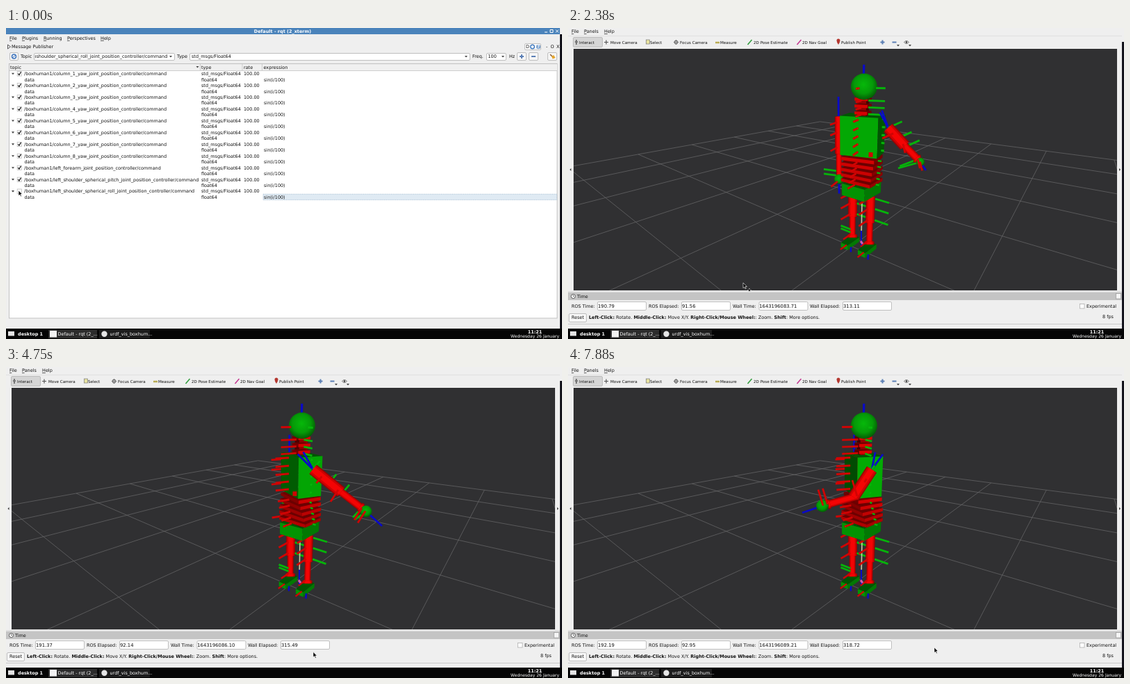
These frames come from a looping animation (800x448 px, 8000 ms). An HTML page:

```html
<!DOCTYPE html>
<html lang="en">
<head>
<meta charset="utf-8">
<title>Message publisher and robot view</title>
<style>
html, body { margin: 0; width: 100%; height: 100%; overflow: hidden; background: #efefef; }
svg { display: block; width: 800px; height: 448px; }
text { font: 6.47px "DejaVu Sans", sans-serif; fill: #111; white-space: pre; }
.b { font-weight: bold; }
.w { fill: #fff; }
.tool { font-size: 5.6px; }
.num { font-size: 6.8px; }
</style>
</head>
<body>
<svg id="stage" viewBox="0 0 800 448" xmlns="http://www.w3.org/2000/svg">
  <defs>
    <radialGradient id="ball" cx=".48" cy=".42" r=".58">
      <stop offset="0" stop-color="#06b80a"/><stop offset=".6" stop-color="#059a08"/><stop offset="1" stop-color="#035a05"/>
    </radialGradient>
    <clipPath id="view"><rect x="8" y="30" width="782" height="348"/></clipPath>
  </defs>
  <g id="publisher"></g>
  <g id="viewer"><g id="viewerFrame"></g><g clip-path="url(#view)"><g id="grid"></g><g id="robot"></g></g><g id="readout"></g></g>
  <g id="taskbar"></g>
  <g id="cursor"></g>
</svg>
<script>
const LOOP = 8000, STEP = 125, SWITCH = 1625;
const el = id => document.getElementById(id);
const f1 = n => n.toFixed(1);

// ---------- drawing helpers ----------
const rect = (x, y, w, h, fill, more = '') => `<rect x="${x}" y="${y}" width="${w}" height="${h}" fill="${fill}" ${more}/>`;
const field = (x, y, w, h, fill = '#fff') => rect(x + .5, y + .5, w - 1, h - 1, fill, 'stroke="#b2b2b2" stroke-width=".8" rx="1.5"');
const text = (x, y, s, cls = '', more = '') => `<text x="${x}" y="${y + 2.4}" class="${cls}" ${more}>${s}</text>`;
const path = (d, stroke, w = 1, fill = 'none') => `<path d="${d}" stroke="${stroke}" stroke-width="${w}" fill="${fill}"/>`;
const disc = (x, y, r, fill, more = '') => `<circle cx="${f1(x)}" cy="${f1(y)}" r="${r}" fill="${fill}" ${more}/>`;
const line = (a, b, stroke, w) => `<line x1="${f1(a[0])}" y1="${f1(a[1])}" x2="${f1(b[0])}" y2="${f1(b[1])}" stroke="${stroke}" stroke-width="${w}"/>`;
const poly = (pts, fill) => `<polygon points="${pts.map(p => p.map(f1).join()).join(' ')}" fill="${fill}"/>`;
const down = (x, y, fill = '#444') => path(`M${x - 2} ${y - 1}h4l-2 2.6z`, 'none', 0, fill);
const menu = (y, items) => items.map(([x, s]) =>
  text(x, y, `<tspan text-decoration="underline">${s[0]}</tspan>${s.slice(1)}`)).join('');
const check = (x, y) => path(`M${x - 2} ${y}l1.6 2l2.6 -4.4`, '#111', 1.2);
const plus = (x, y) => path(`M${x - 3} ${y}h6M${x} ${y - 3}v6`, '#5b7fb5', 2);
const minus = (x, y) => path(`M${x - 3} ${y}h6`, '#5b7fb5', 2);

// ---------- publisher window ----------
const rowY = i => 65.7 + 8.467 * i;

function publisherWindow() {
  const joints = [1, 2, 3, 4, 5, 6, 7, 8].map(n => `column_${n}_yaw`)
    .concat('left_forearm', 'left_shoulder_spherical_pitch', 'left_shoulder_spherical_roll');
  let s = rect(0, 0, 800, 434, '#efefef') + rect(0, 0, 797, 9, '#4a83bb') +
    text(398, 4.2, 'Default - rqt (2_xterm)', 'b w', 'text-anchor="middle"') +
    path('M775 6h4M783 2.5h4v4h-4zM791 2.5l4 4m0 -4l-4 4', '#fff') +
    menu(14.5, [[5, 'File'], [23, 'Plugins'], [54, 'Running'], [88, 'Perspectives'], [136, 'Help']]) +
    path('M2.5 24l4 3l-4 3z', '#333', .8) + text(8, 27, 'Message Publisher') +
    field(746, 22, 24, 10) + text(748, 27, 'D') + disc(757.5, 27, 2.8, 'none', 'stroke="#3e78bd" stroke-width="1.4"') +
    disc(766, 27, 3.2, '#7fa4d0') + text(764.3, 27, '?', 'b w') + text(777, 27, '-') + text(783.5, 27, 'O') + text(792, 27, 'X') +
    field(5, 35, 13, 12, '#f6f6f6') + disc(11.5, 41, 3, 'none', 'stroke="#3f75bd" stroke-width="1.5"') + path('M9 43l5 -4', '#3f75bd') +
    text(21, 41, 'Topic') + field(40, 36, 203, 11) + path('M42.4 39.2v4', '#333', .8) +
    text(43.5, 41, 'shoulder_spherical_roll_joint_position_controller/command') + down(237, 41) +
    text(246, 41, 'Type') + field(264, 36, 404, 11) + text(267, 41, 'std_msgs/Float64') + down(662, 41) +
    text(671, 41, 'Freq.') + field(691, 36, 29, 11) + text(693.5, 41, '100') + down(715, 41) + text(724, 41, 'Hz') +
    field(735, 35, 14, 12, '#f6f6f6') + plus(742, 41) + field(752, 35, 14, 12, '#f6f6f6') + minus(759, 41) +
    field(779, 35, 14, 12, '#f6f6f6') + path('M783 38l3 3', '#8a5a2b', 1.5) + path('M785 41l3 -2l2.5 4l-4 1.5z', 'none', 0, '#e5a52c') +
    rect(4.5, 51.5, 788.5, 366.5, '#fff', 'stroke="#b4b4b4" stroke-width=".8"') + rect(5, 52, 788, 9.5, '#f0f0f0') +
    path('M5 61.5h788M279.5 52v9M340 52v9M368.5 52v9', '#c4c4c4', .8) + down(275.5, 56) +
    text(6, 56.5, 'topic') + text(281, 56.5, 'type') + text(342, 56.5, 'rate') + text(370.5, 56.5, 'expression') +
    rect(370, 239.3, 422.5, 8.3, '#dfeaf3', 'stroke="#9fb9cf" stroke-width=".7" stroke-dasharray="1 .6"');
  joints.forEach((joint, i) => {
    const y = rowY(2 * i), below = rowY(2 * i + 1);
    s += down(10, y) + rect(16.2, y - 3, 6.4, 6.4, '#fff', 'stroke="#b5b5b5" stroke-width=".7"') +
      (i < 10 ? check(19.3, y) : `<g id="lastCheck">${check(19.3, y)}</g>`) +
      text(26, y, `/boxhuman1/${joint}_joint_position_controller/command`) +
      text(281, y, 'std_msgs/Float64') + text(342, y, '100.00') +
      text(26.5, below, 'data') + text(281, below, 'float64') + text(371, below, 'sin(i/100)');
  });
  return s + rect(797, 9, 3, 425, '#101018');
}

// ---------- viewer window ----------
function viewerWindow() {
  let s = rect(0, 0, 800, 434, '#efefef') +
    menu(5, [[5, 'File'], [23, 'Panels'], [52, 'Help']]) + path('M0 11.5h797', '#dcdcdc', .8) +
    field(7, 13, 43, 15, '#d5d5d5');
  const tools = [[16, 'Interact'], [61, 'Move Camera'], [118, 'Select'], [161, 'Focus Camera'], [219, 'Measure'],
    [267, '2D Pose Estimate'], [337, '2D Nav Goal'], [393, 'Publish Point']];
  for (const [x, label] of tools) s += text(x, 20.2, label, 'tool');
  s += path('M12 17v7M10 20h4', '#777', 2) + path('M52 20.5h6M55 17.5v6', '#555', 1.2) +
    rect(112.5, 17, 5, 6, '#e8e3a0', 'stroke="#777" stroke-width=".7"') +
    disc(155.5, 20.5, 2.5, 'none', 'stroke="#555"') + path('M152 20.5h7M155.5 17v7', '#555', .7) +
    path('M212 21h6', '#b9ab53', 2.5) + path('M258.5 24l6 -7', '#2f9c3c', 1.5) + path('M329.5 24l6 -7', '#c3358f', 1.5) +
    path('M386.5 18a2.5 2.5 0 0 1 5 0q0 2 -2.5 6q-2.5 -4 -2.5 -6z', 'none', 0, '#b4372f') +
    plus(452.5, 20.5) + minus(469.5, 20.5) + down(475, 25) + path('M483.5 20.5q3.5 -4 7 0q-3.5 4 -7 0z', '#555', .8, '#fff') +
    disc(487, 20.5, 1.3, '#333') + down(492, 25) +
    rect(8, 30, 782, 348, '#303032') + path('M4.5 202l-2 2l2 2zM793 202l2 2l-2 2z', 'none', 0, '#333') +
    rect(0, 379.5, 797, 1, '#cfcfcf') + rect(0, 381, 797, 11, '#c4c4c4') +
    disc(7.5, 386.5, 3, '#fff', 'stroke="#444" stroke-width=".9"') + path('M7.5 384.5v2h1.5', '#444', .7) + text(13, 386.5, 'Time') +
    rect(788.5, 382.5, 7, 7.5, '#f5f5f5', 'stroke="#999" stroke-width=".7"');
  for (const [x, label, fx] of [[5, 'ROS Time:', 42], [116, 'ROS Elapsed:', 163], [237, 'Wall Time:', 274.5], [348, 'Wall Elapsed:', 395]])
    s += text(x, 400.5, label) + field(fx, 394, 71, 13);
  const bold = t => `<tspan class="b">${t}</tspan>`;
  return s + rect(736.5, 397.5, 6.5, 6.5, '#fff', 'stroke="#b0b0b0" stroke-width=".8"') + text(746, 400.5, 'Experimental') +
    field(1, 411, 26, 13, '#f7f7f7') + text(5, 417, 'Reset') +
    text(30, 416.5, `${bold('Left-Click:')} Rotate. ${bold('Middle-Click:')} Move X/Y. ${bold('Right-Click/Mouse Wheel:')}: Zoom. ${bold('Shift')}: More options.`) +
    rect(0, 426, 797, 1, '#c9c9c9') + rect(797, 20, 3, 414, '#14141c');
}

function taskbar(hover) {
  return rect(0, 433, 800, 15, '#050505') + rect(3, 437, 9, 6.5, '#e4e4e4') + text(17, 440.5, 'desktop 1', 'b w') +
    rect(61, 434.5, 70, 12.5, '#2c2c2c') + rect(63, 436, 10, 9.5, '#f2f2f2') + text(74.5, 440.5, 'Default - rqt (2_...', 'w') +
    rect(134, 434.5, 73, 12.5, hover ? '#4a4a4a' : '#1d1d1d') + disc(141.5, 440.7, 4.2, '#e6e6e6') + text(149.5, 440.5, 'urdf_vis_boxhum...', 'w') +
    text(761, 437.3, '11:21', 'b w', 'text-anchor="middle"') + text(761, 444, 'Wednesday 26 January', 'w', 'text-anchor="middle" style="font-size:6.1px"');
}

// ---------- camera: metres to stage, x to the lower left, y to the lower right, z up ----------
const ROBOT_X = 116.8, GRID_X = 113.3;

function project([x, y, z], originX = ROBOT_X) {
  const w = .2775 - .0634 * y - .0811 * x - .0339 * z;
  return [(originX + 10.65 * y - 60.5 * x - 13.53 * z) / w, (87.3 - 4.18 * y - 5.35 * x - 50.24 * z) / w];
}

function gridLines() {
  // Each line ends just before the camera plane.
  const near = (fixed, other) => Math.min(5, (.2775 - .015 - fixed) / other);
  const at = (x, y) => project([x, y, 0], GRID_X);
  let s = '';
  for (let k = -5; k <= 5; k++) {
    s += line(at(-5, k), at(near(.0634 * k, .0811), k), '#6b6b6c', .7);
    s += line(at(k, -5), at(k, near(.0811 * k, .0634)), '#6b6b6c', .7);
  }
  return s;
}

// ---------- robot ----------
const GREEN = [3, 188, 4], RED = [240, 2, 2];
const X = '#d00404', Y = '#06b40a', Z = '#0a0ac8';
const rad = a => a * Math.PI / 180;
const shade = (rgb, k) => `rgb(${rgb.map(c => Math.round(c * k))})`;
const turn = (deg, [x, y, z]) => {
  const c = Math.cos(rad(deg)), s = Math.sin(rad(deg));
  return [x * c - y * s, x * s + y * c, z];
};
const rod = (yaw, a, b, color, w = 2.8) => line(project(turn(yaw, a)), project(turn(yaw, b)), color, w);

function box(yaw, [cx, cy, z0], [dx, dy, dz], rgb) {
  const ring = z => [[1, -1], [1, 1], [-1, 1], [-1, -1]].map(([a, b]) => project(turn(yaw, [cx + a * dx / 2, cy + b * dy / 2, z])));
  const low = ring(z0), high = ring(z0 + dz);
  let s = poly(high, shade(rgb, .45));
  for (let i = 0; i < 4; i++) {
    const j = (i + 1) % 4;
    if (high[i][0] < high[j][0])
      s += poly([high[i], high[j], low[j], low[i]], shade(rgb, .15 + .8 * Math.max(0, Math.cos(rad(yaw + i * 90 - 38)))));
  }
  return s;
}

const limb = (a, b, w) => line(a, b, '#9a0202', w) + line(a, b, '#d00202', w * .8) + line(a, b, '#f40404', w * .5);

function leg(y) {
  let s = box(0, [.03, y, 0], [.17, .075, .045], GREEN);
  const at = z => project([0, y, z]);
  s += limb(at(.07), at(.3), 9) + limb(at(.26), at(.5), 13) + limb(at(.055), at(.085), 14);
  for (const z of [.49, .4, .3])
    s += rod(0, [.03, y, z], [.16, y, z], X) + rod(0, [0, y + .045, z], [0, y + .17, z], Y);
  return s + rod(0, [.03, y, .1], [.13, y, .1], X, 2.4) + rod(0, [.08, y, .02], [.17, y, .02], X, 2.4) +
    rod(0, [.06, y + .03, 0], [.06, y + .03, -.05], Z, 2.4);
}

function rightArm(yaw) {
  const at = z => project(turn(yaw, [0, -.2, z])), hand = at(.6);
  let s = rod(yaw, [0, -.2, 1.12], [0, -.2, 1.27], Z) + rod(yaw, [0, -.2, .57], [0, -.2, .47], Z) +
    rod(yaw, [0, -.21, .67], [0, -.34, .67], Y) + rod(yaw, [0, -.21, .63], [0, -.34, .63], Y) +
    limb(at(.62), at(.9), 8) + limb(at(.82), at(1.12), 11) + disc(...hand, 7, 'url(#ball)');
  for (const z of [1.08, 1.0, .88, .59]) s += rod(yaw, [.03, -.2, z], [.16, -.2, z], X);
  return s;
}

// time, yaw, hand, hand radius, elbow, blue tip, red stick, green stick, shoulder stick
const POSES = [
  [1625, 20, 506, 192, 6, 481, 165, 8, 12, 3, 13, 20, -9, -11],
  [2375, 16, 507, 193, 6, 482, 167, 8, 12, 3, 13, 20, -9, -12],
  [3375, -9, 524, 200, 7.5, 488, 173, 19, 16, -2, 17, 15, -13, -24],
  [4750, -27, 518, 208, 8.5, 478, 177, 23, 21, -11, 17, 10, -12, -22],
  [5750, -17, 514, 216, 9, 480, 181, 21, 23, -10, 15, 14, -13, -19],
  [6125, -19, 514, 217, 9, 479, 182, 21, 22, -10, 15, 13, -13, -18],
  [7000, -30, 438, 230, 10, 442, 192, -8, 22, -10, -6, 8, -9, 4],
  [7875, -34, 366, 200, 9, 416, 186, -29, 10, -7, -23, 4, -6, 16]
];

function between(keys, t) {
  let i = 1;
  while (i < keys.length - 1 && keys[i][0] < t) i++;
  const a = keys[i - 1], b = keys[i];
  const u = Math.min(1, Math.max(0, (t - a[0]) / (b[0] - a[0]))), e = u * u * (3 - 2 * u);
  return a.slice(1).map((v, n) => v + (b[n + 1] - v) * e);
}

function leftArm(yaw, [hx, hy, hr, ex, ey, tx, ty, rx, ry, gx, gy, bx]) {
  const shoulder = project(turn(yaw, [.01, .2, 1.06])), elbow = [ex, ey], hand = [hx, hy];
  const mix = (a, b, u) => [a[0] + (b[0] - a[0]) * u, a[1] + (b[1] - a[1]) * u];
  const stick = (p, dx, dy, color) => line(p, [p[0] + dx, p[1] + dy], color, 2.8);
  const wrist = mix(elbow, hand, .85);
  let s = stick(shoulder, bx, -22, Z) + stick(shoulder, bx * .5 - 3, -25, Z);
  for (const p of [shoulder, mix(shoulder, elbow, .65), mix(elbow, hand, .15)]) s += stick(p, gx, gy, Y);
  s += stick(wrist, -gx * 1.3, -gy * 1.1, Y) + stick(hand, -gx * 1.6, -gy, Y) + stick(hand, tx, ty, Z) +
    limb(elbow, hand, 11) + limb(shoulder, mix(elbow, hand, .1), 17) +
    limb(mix(elbow, hand, .78), wrist, 14) + disc(hx, hy, hr, 'url(#ball)');
  return s + stick(mix(shoulder, elbow, .35), -gx * .8, -gy * .8, X) + stick(elbow, rx, ry, X) + stick(wrist, rx, ry, X) + stick(mix(elbow, hand, .98), rx, ry, X);
}

function robot(t) {
  const [yaw, ...arm] = between(POSES, t);
  let s = rightArm(yaw) + leg(-.09) + line([423, 250], [422, 305], '#cfc7a4', 1.6) + leg(.09) +
    rod(0, [0, -.11, .13], [0, -.22, .13], Y) + rod(0, [0, -.11, .1], [0, -.22, .1], Y) +
    line([422, 292], [422, 313], Z, 2) + line([421, 307], [424, 311], '#d05bb0', 3) +
    box(0, [0, 0, .5], [.24, .22, .1], GREEN) + box(yaw * .5, [0, 0, .6], [.15, .2, .24], [150, 2, 2]);
  for (let i = 0; i < 5; i++) {
    const part = yaw * (i + 1) / 6, z = .61 + i * .047;
    s += box(part, [0, 0, z], [.2, .27, .026], RED) + rod(part, [.1, 0, z], [.2, 0, z], X) + rod(part, [0, .13, z], [0, .16, z], Y, 2.4);
  }
  s += box(yaw, [0, 0, .84], [.195, .295, .3], GREEN);
  for (let z = .88; z < 1.13; z += .06) s += rod(yaw, [.1, 0, z], [.21, 0, z], X, 3) + rod(yaw, [0, .15, z], [0, .175, z], Y, 3);
  s += rod(yaw, [.1, .1, .85], [.1, .1, .885], X, 6);
  s += box(yaw, [0, 0, 1.14], [.07, .07, .13], [165, 2, 2]);
  for (const z of [1.15, 1.2, 1.25])
    s += box(yaw, [0, 0, z], [.1, .1, .022], RED) + rod(yaw, [.04, 0, z], [.165, 0, z], X) + rod(yaw, [0, .04, z], [0, .165, z], Y);
  s += rod(yaw, [0, 0, 1.43], [0, 0, 1.5], Z, 3.2) + disc(426, 84.5, 19, 'url(#ball)') +
    rod(yaw, [.085, 0, 1.34], [.165, 0, 1.34], X, 3) + rod(yaw, [0, .095, 1.34], [0, .165, 1.34], Y, 3);
  return s + leftArm(yaw, arm);
}

// ---------- clocks, cursor, playback ----------
const CLOCKS = [
  [1625, 190.55, 91.32, 82.96, 312.36], [2375, 190.79, 91.56, 83.71, 313.11], [3375, 191.11, 91.87, 84.80, 314.21],
  [4750, 191.37, 92.14, 86.10, 315.49], [5750, 191.61, 92.37, 87.07, 316.60], [7875, 192.19, 92.95, 89.21, 318.72]
];
const MOUSE = [[375, 18, 234], [1375, 154.5, 436.5], [1750, 154.5, 436.5], [2375, 252, 367], [3125, 442, 410.5], [7125, 442, 410.5], [7875, 527, 404]];

function linear(keys, t) {
  const i = Math.max(1, keys.findIndex(k => k[0] >= t)), a = keys[i - 1], b = keys[i];
  return a.slice(1).map((v, n) => v + (b[n + 1] - v) * (t - a[0]) / (b[0] - a[0]));
}

function readout(t) {
  const [ros, rosGone, wall, wallGone] = linear(CLOCKS, t);
  const fps = t < 3000 ? 8 : t < 4000 ? 9 : t < 5000 ? 8 : t < 7500 ? 7 : 8;
  const number = (x, v) => text(x, 400.5, v.toFixed(2), 'num');
  return number(43, ros) + number(164, rosGone) + number(275.3, 1643196000 + wall) + number(396, wallGone) +
    text(769, 415.5, fps + ' fps');
}

function pointer(t) {
  const [x, y] = between(MOUSE, t);
  const busy = t >= SWITCH && t < 2750;
  return `<g transform="translate(${f1(x)} ${f1(y)})">` +
    path('M0 0v7.5l1.8 -1.5l1.3 2.8l1.2 -.6l-1.3 -2.7h2.4z', '#fff', .6, '#000') +
    (busy ? path('M6.5 10.5h5M9 8v5', '#ddd', 1.2) + disc(9, 10.5, 1.5, '#222') : '') + '</g>';
}

function draw(t) {
  const viewing = t >= SWITCH;
  el('publisher').style.display = viewing ? 'none' : '';
  el('viewer').style.display = viewing ? '' : 'none';
  el('lastCheck').style.display = t < STEP ? 'none' : '';
  if (viewing) {
    el('robot').innerHTML = robot(t);
    el('readout').innerHTML = readout(t);
  }
  el('taskbar').innerHTML = taskbar(t >= 1250 && t < 1875);
  el('cursor').innerHTML = pointer(t);
}

el('publisher').innerHTML = publisherWindow();
el('viewerFrame').innerHTML = viewerWindow();
el('grid').innerHTML = gridLines();

const start = performance.now();
let shown = -1;
function tick() {
  const t = Math.floor(((performance.now() - start) % LOOP) / STEP) * STEP;
  if (t !== shown) draw(shown = t);
  requestAnimationFrame(tick);
}
tick();
</script>
</body>
</html>
```
